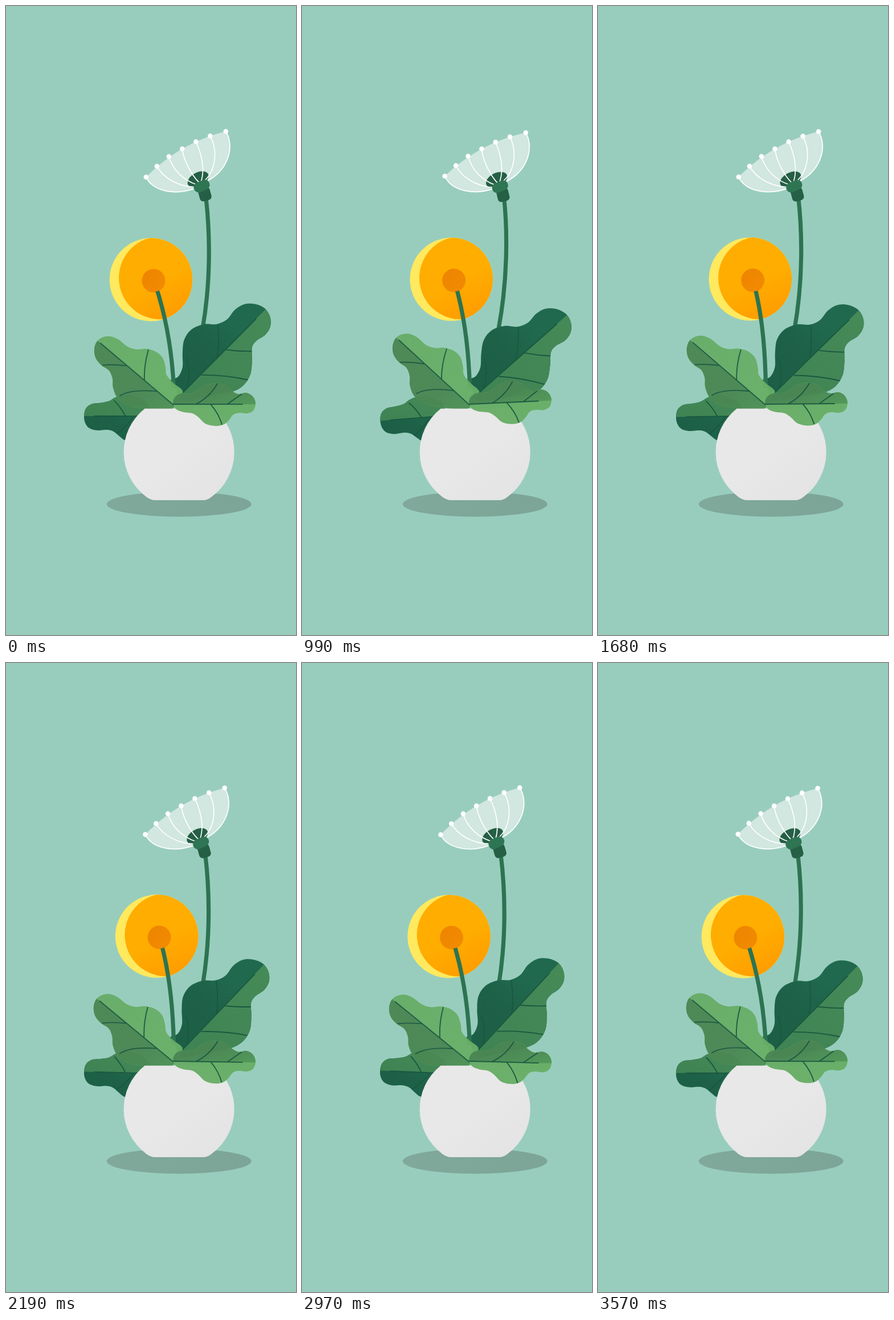
An HTML page that plays this animation: 509x1101 px, repeating every 3600 ms.

```html
<!DOCTYPE html>
<html lang="en">
<head>
<meta charset="utf-8">
<title>Potted flowers</title>
<style>
  html, body { margin: 0; width: 100%; height: 100%; overflow: hidden; background: #98cdbd; }
  svg { display: block; width: 100%; height: 100%; }
  .line { fill: none; }
  .vein { fill: none; stroke: #1a583f; stroke-width: 1.9; stroke-linecap: round; }
  .rib { fill: none; stroke: #fff; stroke-width: 1.7; }
  .stem { fill: none; stroke: #2d7352; stroke-width: 7.2; }
</style>
</head>
<body>
<svg viewBox="0 0 509 1101" xmlns="http://www.w3.org/2000/svg">
  <defs>
    <linearGradient id="orange" x1=".3" y1=".1" x2=".8" y2="1">
      <stop offset=".45" stop-color="#ffad00"/><stop offset="1" stop-color="#ff9900"/>
    </linearGradient>
    <linearGradient id="core" x1="0" y1="0" x2="1" y2="1">
      <stop offset="0" stop-color="#ee8400"/><stop offset="1" stop-color="#f28b02"/>
    </linearGradient>
    <linearGradient id="clay" x1=".2" y1=".1" x2=".9" y2=".9">
      <stop offset=".4" stop-color="#e8e8e8"/><stop offset="1" stop-color="#e4e4e4"/>
    </linearGradient>
    <linearGradient id="shade" x1="0" x2="1">
      <stop offset="0" stop-color="#80a99b"/><stop offset="1" stop-color="#7ca597"/>
    </linearGradient>
    <linearGradient id="deep" x1="0" y1="1" x2="1" y2="0">
      <stop offset=".1" stop-color="#1c5f46"/><stop offset=".45" stop-color="#1d6148"/>
      <stop offset=".7" stop-color="#20694e"/>
    </linearGradient>
    <linearGradient id="mid" x1="0" y1="1" x2="1" y2="0">
      <stop offset=".1" stop-color="#3f8354"/><stop offset="1" stop-color="#478b58"/>
    </linearGradient>
    <linearGradient id="moss" x1="0" y1="0" x2="1" y2="1">
      <stop offset=".1" stop-color="#4b8652"/><stop offset=".6" stop-color="#4a8753"/>
      <stop offset="1" stop-color="#529a57"/>
    </linearGradient>
    <linearGradient id="fresh" x1="0" y1="0" x2="1" y2="1">
      <stop offset="0" stop-color="#67ac66"/><stop offset="1" stop-color="#69b067"/>
    </linearGradient>
    <clipPath id="disc"><circle cx="254.2" cy="479" r="72.8"/></clipPath>
  </defs>

  <ellipse cx="303.7" cy="872" rx="127" ry="22" fill="url(#shade)"/>

  <path id="tallStem" class="stem"/>
  <g id="umbel">
    <path fill="#d1e7e0" d="M246 299.5Q305 239.5 386 219.5C402 245 392 290 346 310L340 316C300 334 258 325 246 299.5Z"/>
    <ellipse cx="337.3" cy="303.5" rx="20" ry="12" transform="rotate(-28 337.3 303.5)" fill="#255f45"/>
    <path class="rib" d="M246 299.5C258 325 300 334 340 316M386 219.5C402 245 392 290 346 310
      M265 280.5C276 300 300 316 333 317M286 263.5C292 285 310 305 336 313M309.5 250C312 270 325 295 339 309
      M333.5 237.5C343 258 350 285 342 309M358.5 227.5C373 255 368 290 346 308"/>
    <rect x="338.5" y="318" width="21" height="23" rx="6" transform="rotate(-15 349 329)" fill="#255f45"/>
    <rect x="329" y="306.5" width="29" height="17.5" rx="8.5" transform="rotate(-24 343.5 315)" fill="#2e7553"/>
    <g id="tips" fill="#fff"></g>
  </g>

  <g id="back"></g>

  <g id="sun">
    <circle cx="254.2" cy="479" r="72.8" fill="#ffe95f"/>
    <g clip-path="url(#disc)"><circle cx="270.2" cy="476" r="72.4" fill="url(#orange)"/></g>
    <circle cx="258.7" cy="480.8" r="20.5" fill="url(#core)"/>
  </g>
  <path id="shortStem" class="stem"/>

  <g id="left"></g>
  <path fill="url(#clay)" d="M243.5 704.8A97 97 0 0 0 246 859Q253 865 262 865H346Q354 865 361 859A97 97 0 0 0 364 704.8Z"/>
  <g id="front"></g>
</svg>
<script>
const NS = 'http://www.w3.org/2000/svg';
const $ = id => document.getElementById(id);

function add(parent, tag, attrs) {
  const el = document.createElementNS(NS, tag);
  for (const k in attrs) el.setAttribute(k, attrs[k]);
  return parent.appendChild(el);
}

// Smooth closed curve through a flat list of x, y values.
function blob(list) {
  const n = list.length / 2;
  const at = i => { const k = (i + n) % n * 2; return [list[k], list[k + 1]]; };
  let d = 'M' + at(0);
  for (let i = 0; i < n; i++) {
    const a = at(i - 1), b = at(i), c = at(i + 1), e = at(i + 2);
    const c1 = b.map((v, k) => v + (c[k] - a[k]) / 6);
    const c2 = c.map((v, k) => v - (e[k] - b[k]) / 6);
    d += `C${c1} ${c2} ${c}`;
  }
  return d + 'Z';
}

const leaves = [
  { layer: 'back', pivot: [305, 680], turn: 5.9, fill: 'deep', other: 'mid',
    edge: [288,656, 302,649, 310,632, 310,608, 313,584, 326,566, 348,557, 370,557, 388,549, 402,532,
      419,522, 438,522, 455,530, 464,545, 464,562, 455,576, 440,586, 432,598, 432,620, 429,645,
      417,664, 398,675, 370,680, 310,690, 298,670],
    half: '300,687 470,517 500,529 500,720 300,720',
    veins: 'M308 679L439 548M372 559Q375 590 371 614M316 617Q325 642 318 667M387 602Q410 605 433 604.5M344 646Q385 646 424 654.5' },
  { layer: 'left', pivot: [240, 717], turn: -7.2, fill: 'deep', other: 'mid',
    edge: [137,718, 140,705, 150,697, 165,695, 180,692, 192,685, 207,681, 228,684, 250,700, 250,745,
      225,762, 209,760, 199,753, 189,745, 177,742, 160,743, 146,739, 139,730],
    half: '120,718 260,718 260,660 120,660',
    veins: 'M155 718H235M190 691Q202 703 209 717M223 720Q210 738 195 748' },
  { layer: 'left', pivot: [295, 700], turn: 3.6, fill: 'fresh', other: 'moss', veil: .95,
    edge: [155,602, 159,588, 169,580, 183,578, 198,584, 213,596, 229,601, 246,600, 263,605, 275,616,
      280,632, 282,646, 294,660, 310,674, 303,690, 293,704, 270,706, 240,704, 214,699, 196,686,
      188,668, 187,652, 181,638, 168,629, 158,617],
    half: '140,568 310,712.5 310,760 120,760',
    veins: 'M294 698.5L166 590M250 602Q242 630 243 655M170 628.5Q190 627 211 629.5M200 682Q220 670 266 674.5' },
  { layer: 'front', pivot: [295, 697], turn: -4.2, fill: 'fresh', other: 'moss', veil: .97,
    edge: [293,695, 297,684, 308,678, 323,678, 335,673, 348,664, 368,660, 386,664, 397,674, 408,679,
      422,677, 433,683, 438,695, 434,708, 423,713, 410,712, 399,715, 391,725, 381,733, 366,735,
      350,731, 338,720, 327,713, 312,711, 299,706],
    half: '280,697 450,697 450,640 280,640',
    veins: 'M294 697H415M371 661Q357 685 334 696.5M413 679.5Q401 688 389 696.5M360 698Q373 713 379 732' }
];

leaves.forEach((leaf, i) => {
  const id = 'leaf' + i, d = blob(leaf.edge);
  add(add($(layerId(leaf)), 'clipPath', { id }), 'path', { d });
  leaf.g = add($(layerId(leaf)), 'g', { opacity: leaf.veil || 1 });
  add(leaf.g, 'path', { d, fill: `url(#${leaf.fill})` });
  const inner = add(leaf.g, 'g', { 'clip-path': `url(#${id})` });
  add(inner, 'polygon', { points: leaf.half, fill: `url(#${leaf.other})` });
  add(inner, 'path', { d: leaf.veins, class: 'vein' });
});
function layerId(leaf) { return leaf.layer; }

for (const [cx, cy] of [[246, 299.5], [265, 280.5], [286, 263.5], [309.5, 250], [333.5, 237.5], [358.5, 227.5], [386, 219.5]])
  add($('tips'), 'circle', { cx, cy, r: 4.3 });

const LOOP = 3600;
const wave = (t, peak, k) => Math.cos(k * 2 * Math.PI * (t - peak) / LOOP);
const spin = (el, deg, [x, y]) => el.setAttribute('transform', `rotate(${deg} ${x} ${y})`);

function draw(t) {
  // sway of the leaves and the white flower, 0 in the starting pose
  const s = .055 + .479 * wave(t, 930, 1) + .055 * wave(t, 930, 2) + .035 * wave(t, 930, 3);
  for (const leaf of leaves) spin(leaf.g, leaf.turn * s, leaf.pivot);
  spin($('umbel'), 2.6 * s, [310, 460]);
  const w = 5.8 * s;
  $('tallStem').setAttribute('d', `M${351 + w} 335C${358 + w * .8} 395 ${360 + w * .3} 480 345 565L338 600`);

  // sideways drift of the yellow flower
  const x = 6.7 + 6 * wave(t, 1730, 1) + .5 * wave(t, 1730, 3);
  $('sun').setAttribute('transform', `translate(${x} ${-.08 * x}) rotate(${.28 * x} 254.2 479)`);
  $('shortStem').setAttribute('d', `M${265.5 + x * .87} 499C${280 + x * .6} 545 ${291 + x * .2} 600 294.5 668`);
}

const start = performance.now();
function tick() {
  draw((performance.now() - start) % LOOP);
  requestAnimationFrame(tick);
}
tick();
</script>
</body>
</html>
```
